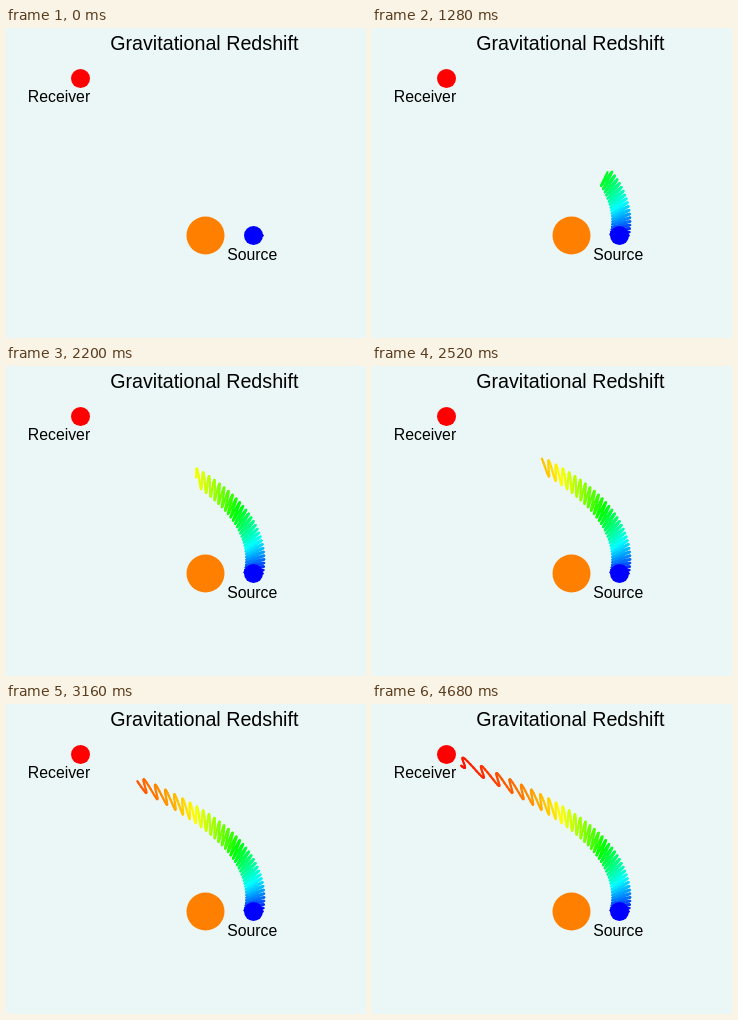
Recreate the animation shown at these times as an HTML page with a canvas. Size 360 by 310 pixels, loop 5.08 s.

```html
<!DOCTYPE html>
<html lang="en">
<head>
<meta charset="utf-8">
<title>Gravitational Redshift</title>
<style>
  html, body { margin: 0; width: 100%; height: 100%; overflow: hidden; background: #ebf7f6; }
  canvas, svg { position: absolute; left: 0; top: 0; width: 360px; height: 310px; }
  text { font-family: "Liberation Sans", Arial, sans-serif; font-size: 15.8px; text-anchor: middle; }
  .title { font-size: 19.7px; }
</style>
</head>
<body>
<canvas id="wave" width="360" height="310"></canvas>
<svg viewBox="0 0 360 310">
  <circle cx="199.5" cy="207.5" r="19" fill="#ff8000"/>
  <circle cx="74.5" cy="50.5" r="9.5" fill="#f00"/>
  <circle cx="247.5" cy="207.5" r="9.5" fill="#00f"/>
  <text class="title" x="198.3" y="22">Gravitational Redshift</text>
  <text x="53" y="74">Receiver</text>
  <text x="246.2" y="232">Source</text>
</svg>
<script>
  const LOOP = 5080, STEP = 40, LAST = 97;
  const STAR = { x: 199.5, y: 207.5 };
  const END = 128.5;          // sweep from source to receiver, degrees
  const PERIOD = END / 38;    // degrees per oscillation
  const AMP = 9.3;
  const SAMPLE = PERIOD / 16;
  const RAD = Math.PI / 180;

  const ctx = document.getElementById('wave').getContext('2d');
  ctx.lineWidth = 2.2;
  ctx.lineCap = 'round';

  // Inverse distance from the star along the bent light path
  function inverseRadius(deg) {
    const a = deg * RAD;
    return 0.02083 - a * (0.005336 + a * (0.000069 + a * 0.000312));
  }

  // Light is slower close to the star
  function sweepRate(deg) {
    const u = inverseRadius(deg);
    return 18900 * u * u * (1 - 38 * u);
  }

  // Angle of the wave front at each step
  const fronts = [0.3];
  for (let i = 1; i <= LAST; i++) {
    const a = fronts[i - 1];
    fronts.push(Math.min(END, a + sweepRate(a + sweepRate(a) / 2)));
  }

  function wavePoint(deg) {
    const r = 1 / inverseRadius(deg) + AMP * Math.cos(2 * Math.PI * deg / PERIOD);
    return [STAR.x + r * Math.cos(deg * RAD), STAR.y - r * Math.sin(deg * RAD)];
  }

  function draw(front) {
    ctx.clearRect(0, 0, 360, 310);
    for (let a = 0; a < front; a += SAMPLE) {
      ctx.strokeStyle = `hsl(${240 * (1 - a / END)}, 100%, 50%)`;
      ctx.beginPath();
      ctx.moveTo(...wavePoint(a));
      ctx.lineTo(...wavePoint(Math.min(a + SAMPLE, front)));
      ctx.stroke();
    }
  }

  const start = performance.now();
  let shown = -1;
  function tick() {
    const t = (performance.now() - start) % LOOP;
    const step = Math.min(LAST, Math.floor(t / STEP));
    if (step !== shown) {
      draw(fronts[step]);
      shown = step;
    }
    requestAnimationFrame(tick);
  }
  tick();
</script>
</body>
</html>
```
